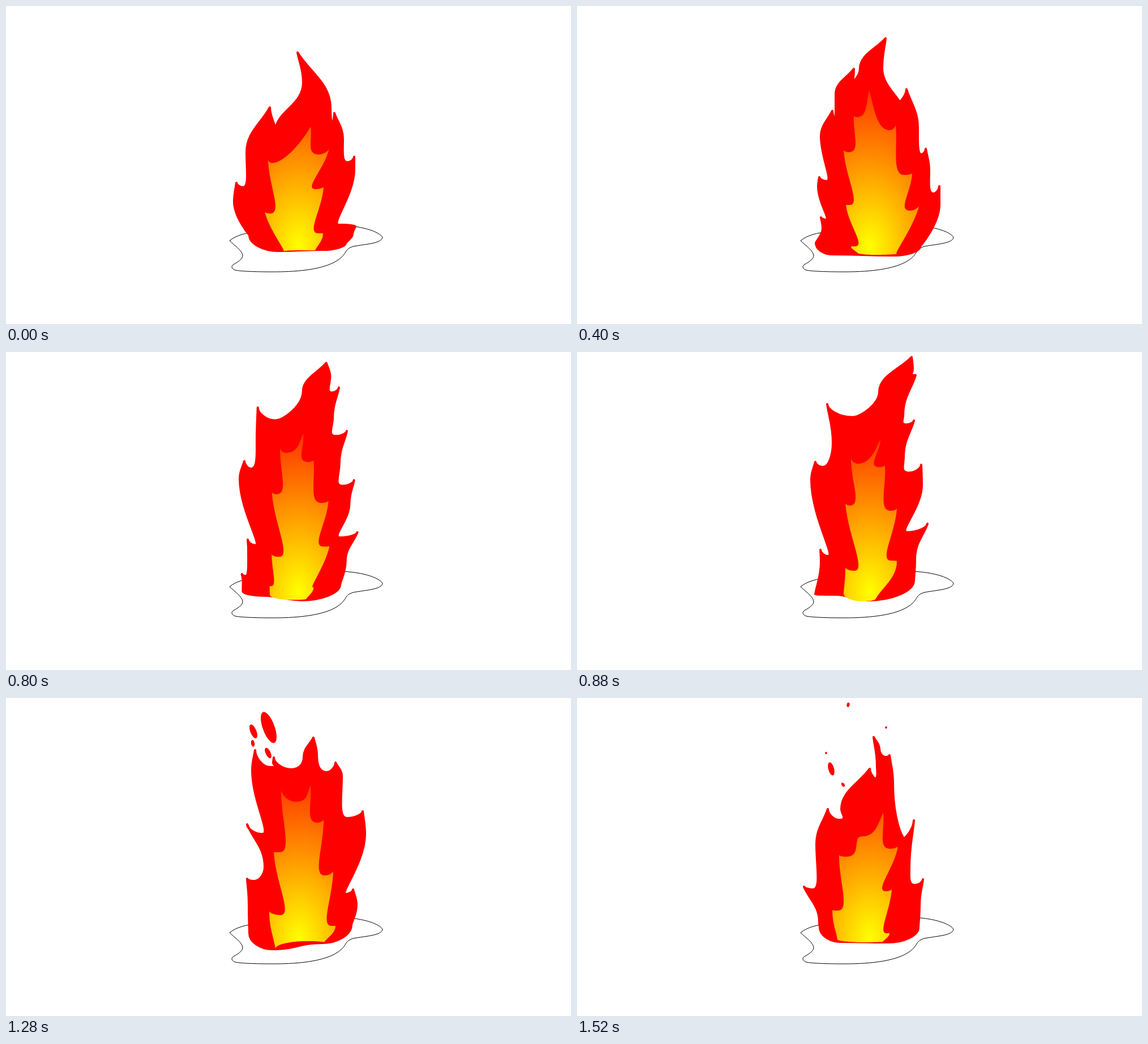
Write an HTML page with a canvas that moves like this. It is 998 by 561 pixels and loops after 1.6 s.

```html
<!DOCTYPE html>
<html lang="en">
<head>
<meta charset="utf-8">
<title>Fire</title>
<style>
html, body { margin: 0; width: 100%; height: 100%; overflow: hidden; background: #fff; }
canvas { display: block; width: 998px; height: 561px; }
</style>
</head>
<body>
<canvas id="stage" width="998" height="561"></canvas>
<script>
const LOOP = 1600, STEP = 80, RISE = 18;
const ctx = document.getElementById('stage').getContext('2d');
const poses = [];

const mix = (a, b, k) => a.map((v, i) => v + (b[i] - v) * k);
const clamp = (v, lo, hi) => Math.min(hi, Math.max(lo, v));
const group = (list, n) => list.length ? [list.slice(0, n), ...group(list.slice(n), n)] : [];

// A side runs from apex to foot. Outer tongues: tip, belly, valley. Inner tongues: tip, valley.
// Sparks: x, y, half length, tilt in degrees.
function pose(at, { outer, inner, sparks = [] }) {
  const shape = ([left, right, foot], size) => ({
    left: group(group(left, 2), size),
    right: group(group(right, 2), size),
    foot: group(foot, 2)
  });
  poses.push({ at, outer: shape(outer, 3), inner: shape(inner, 2), sparks: group(sparks, 4) });
}

pose(0, {
  outer: [
    [515, 82, 525, 135, 476, 221, 466, 179, 425, 258, 419, 320, 407, 312, 403, 345, 430, 404],
    [515, 82, 573, 180, 575, 220, 580, 189, 595, 235, 603, 276, 615, 266, 615, 288, 588, 386,
      617, 389, 612, 402, 600, 418],
    [480, 432, 560, 430]],
  inner: [
    [538, 213, 470, 277, 463, 271, 467, 366, 457, 363, 490, 433],
    [538, 213, 552, 262, 571, 250, 547, 323, 561, 319, 552, 401, 560, 401, 546, 431],
    [515, 431]]
});

pose(400, {
  outer: [
    [545, 57, 500, 110, 487, 143, 489, 111, 457, 155, 457, 208, 451, 185, 431, 230, 441, 309,
      428, 302, 426, 318, 440, 377, 431, 373, 434, 392, 422, 418],
    [545, 57, 539, 110, 570, 170, 582, 147, 602, 215, 608, 262, 616, 252, 622, 290, 629, 331,
      640, 318, 640, 350, 606, 424],
    [450, 438, 560, 440]],
  inner: [
    [516, 148, 495, 196, 489, 194, 480, 258, 471, 254, 482, 351, 475, 351, 491, 424, 484, 424, 495, 435],
    [516, 148, 552, 219, 563, 209, 578, 298, 592, 295, 588, 361, 605, 350, 565, 437],
    [525, 439]]
});

pose(640, {
  outer: [
    [515, 40, 506, 68, 455, 132, 450, 110, 425, 150, 432, 212, 421, 190, 411, 220, 434, 303,
      421, 295, 422, 308, 428, 332, 408, 321, 414, 360, 413, 412],
    [515, 40, 531, 70, 541, 133, 568, 106, 579, 128, 584, 189, 616, 176, 612, 225, 611, 283,
      628, 281, 601, 335, 604, 346, 624, 348, 605, 378, 580, 425],
    [450, 433, 540, 437]],
  inner: [
    [504, 124, 490, 140, 485, 134, 470, 211, 461, 209, 468, 312, 460, 311, 463, 387, 455, 386, 456, 433],
    [504, 124, 533, 176, 542, 173, 563, 239, 579, 235, 572, 294, 584, 290, 572, 376, 574, 376, 535, 437],
    [495, 432]],
  sparks: [484, 26, 16, -48, 496, 46, 10, -60, 645, 258, 14, 25, 634, 283, 4, 15, 566, 10, 3, 0]
});

pose(880, {
  outer: [
    [591, 9, 534, 70, 486, 115, 442, 92, 452, 160, 434, 203, 421, 194, 414, 225, 444, 360,
      430, 349, 431, 370, 421, 427],
    [591, 9, 593, 30, 593, 41, 598, 41, 576, 112, 582, 128, 595, 121, 577, 185, 586, 213,
      608, 199, 609, 235, 583, 318, 619, 303, 597, 365, 595, 403],
    [455, 428, 515, 438]],
  inner: [
    [536, 154, 496, 197, 484, 187, 482, 271, 474, 266, 490, 386, 474, 380, 471, 426],
    [536, 154, 534, 203, 544, 200, 554, 280, 565, 276, 555, 368, 565, 369, 528, 435],
    [505, 440]]
});

pose(1120, {
  outer: [
    [540, 115, 503, 123, 482, 93, 454, 73, 458, 95, 443, 122, 429, 106, 424, 150, 458, 304,
      445, 309, 430, 392, 436, 420],
    [540, 115, 543, 125, 550, 137, 574, 103, 604, 160, 606, 202, 623, 199, 624, 218, 603, 300,
      627, 283, 634, 315, 600, 405],
    [468, 437, 545, 439]],
  inner: [
    [498, 166, 488, 206, 474, 204, 490, 317, 480, 318, 478, 378, 472, 395, 473, 434],
    [498, 166, 547, 206, 565, 201, 576, 267, 585, 267, 569, 370, 577, 371, 532, 438],
    [505, 434]],
  sparks: [429, 30, 4, 25, 441, 53, 14, -18, 580, 11, 9, -5, 594, 32, 8, 10,
    568, 54, 7, -5, 546, 103, 6, 35, 421, 306, 8, -33]
});

pose(1280, {
  outer: [
    [543, 70, 526, 104, 504, 126, 473, 105, 472, 115, 467, 122, 440, 92, 435, 128, 453, 240,
      426, 223, 457, 298, 438, 323, 426, 319, 429, 365, 430, 415],
    [543, 70, 549, 100, 566, 131, 582, 114, 593, 138, 602, 212, 630, 200, 634, 240, 600, 346,
      613, 338, 619, 365, 610, 400],
    [470, 443, 560, 432]],
  inner: [
    [538, 154, 512, 183, 486, 161, 484, 272, 473, 272, 485, 383, 465, 376, 476, 442],
    [538, 154, 550, 220, 561, 214, 563, 313, 578, 305, 575, 402, 582, 402, 562, 431],
    [530, 429]],
  sparks: [464, 52, 29, -20, 437, 59, 13, -22, 436, 80, 6, -10, 463, 97, 10, -25]
});

pose(1520, {
  outer: [
    [524, 69, 530, 120, 527, 143, 517, 125, 467, 196, 463, 215, 443, 196, 423, 258, 417, 338,
      401, 333, 428, 395, 429, 405],
    [524, 69, 534, 90, 545, 104, 552, 101, 558, 150, 577, 248, 595, 216, 587, 300, 597, 330,
      611, 320, 605, 365, 603, 405],
    [465, 430, 550, 431]],
  inner: [
    [541, 202, 505, 244, 496, 248, 475, 280, 463, 277, 461, 375, 451, 374, 460, 426],
    [541, 202, 553, 266, 567, 261, 546, 341, 556, 337, 547, 415, 552, 415, 540, 430],
    [505, 431]],
  sparks: [479, 12, 4, 15, 546, 52, 2, 45, 440, 97, 2, 0, 449, 125, 12, -15, 470, 153, 4, -35]
});

const puddle = new Path2D('M395 414C407 404 425 400 445 398L580 387C625 386 660 398 665 408' +
  'C664 419 635 420 614 424C596 429 604 437 585 449C555 469 490 469 470 469' +
  'C440 469 415 468 405 466C397 463 398 458 402 456C412 450 418 446 418 440C417 431 404 423 395 414Z');

// Tongues pair up from the apex down; spare ones grow out of the foot.
function morphSide(a, b, k) {
  const size = a[0].length;
  const tongue = (s, i) => s[i] || Array(size).fill(s[s.length - 1][size - 1]);
  return Array.from({ length: Math.max(a.length, b.length) }, (_, i) =>
    tongue(a, i).map((p, j) => mix(p, tongue(b, i)[j], k)));
}

// Cubic pieces of one side; `side` is +1 where inward points right.
function sideCurves(tongues, side) {
  const out = [];
  tongues.forEach((tongue, i) => {
    const tip = tongue[0], valley = tongue[tongue.length - 1];
    const belly = tongue.length > 2 ? tongue[1] : null;
    const next = tongues[i + 1] && tongues[i + 1][0];
    const from = belly || tip;
    const drop = valley[1] - from[1];

    if (belly) {
      out.push([tip, mix(tip, belly, 0.35), [belly[0], belly[1] - 0.45 * (belly[1] - tip[1])], belly]);
    }
    if (!next) {
      out.push([from, [from[0], from[1] + 0.45 * drop], mix(valley, from, 0.3), valley]);
      return;
    }
    // Wide hooks get a round valley, steep ones a sharp notch.
    const dx = next[0] - valley[0], dy = next[1] - valley[1], width = Math.abs(dx);
    const sharp = clamp(-dy / (width || 1) - 1.4, 0, 1);
    const curl = belly ? Math.min(16, 0.9 * width) : Math.min(22, 2 * width + 6);
    const lean = belly ? 0 : 0.25 * (valley[0] - tip[0]);
    out.push([from, [from[0] + lean, from[1] + 0.47 * drop],
      [valley[0] + side * curl * (1 - sharp), valley[1] - 0.4 * drop * sharp], valley]);
    out.push([valley, [valley[0] + 0.55 * dx * (1 - sharp), valley[1] + 0.3 * dy * sharp],
      [next[0], next[1] - 0.4 * dy], next]);
  });
  return out;
}

function footCurves(left, mids, right) {
  const pts = [left, ...mids, right], last = pts.length - 1;
  return pts.slice(1).map((b, i) => {
    const a = pts[i], dx = 0.5 * (b[0] - a[0]), dy = 0.55 * (b[1] - a[1]);
    return [a,
      i ? [a[0] + dx, a[1]] : [a[0], a[1] + dy],
      i + 1 < last ? [b[0] - dx, b[1]] : [b[0], b[1] - dy], b];
  });
}

function trace(a, b, k) {
  const left = sideCurves(morphSide(a.left, b.left, k), 1);
  const right = sideCurves(morphSide(a.right, b.right, k), -1);
  const mids = a.foot.map((p, i) => mix(p, b.foot[i], k));
  const foot = footCurves(left[left.length - 1][3], mids, right[right.length - 1][3]);
  const back = right.map(c => c.slice().reverse()).reverse();
  ctx.beginPath();
  ctx.moveTo(...left[0][0]);
  for (const [, p, q, end] of [...left, ...foot, ...back]) ctx.bezierCurveTo(...p, ...q, ...end);
  ctx.closePath();
}

// Radial glow, narrower than tall, centred on the hot spot.
const HOT = [517, 424], SQUASH = 0.65;
const glow = ctx.createRadialGradient(0, 0, 0, 0, 0, 350);
glow.addColorStop(0, '#ffff00');
glow.addColorStop(1, '#ff0000');

function drawSparks(t) {
  ctx.fillStyle = '#f00';
  for (const { at, sparks } of poses) {
    const age = (t - at) / STEP;
    if (Math.abs(age) > 1) continue;
    for (const [x, y, len, deg] of sparks) {
      ctx.beginPath();
      ctx.ellipse(x, y - RISE * age, 1.2 + 0.32 * len, len, deg * Math.PI / 180, 0, 2 * Math.PI);
      ctx.fill();
    }
  }
}

function draw(t) {
  const i = poses.filter(p => p.at <= t).length;
  const a = poses[i - 1], b = poses[i % poses.length];
  const k = (t - a.at) / ((b.at || LOOP) - a.at);

  ctx.fillStyle = '#fff';
  ctx.fillRect(0, 0, 998, 561);
  ctx.lineWidth = 1;
  ctx.strokeStyle = '#000';
  ctx.stroke(puddle);

  trace(a.outer, b.outer, k);
  ctx.fillStyle = ctx.strokeStyle = '#f00';
  ctx.lineWidth = 4;
  ctx.lineJoin = 'round';
  ctx.fill();
  ctx.stroke();

  trace(a.inner, b.inner, k);
  ctx.save();
  ctx.translate(...HOT);
  ctx.scale(SQUASH, 1);
  ctx.fillStyle = glow;
  ctx.fill();
  ctx.restore();

  drawSparks(t);
}

let start, shown = 0;
function tick(now) {
  start ??= now;
  const t = Math.floor((now - start) % LOOP / STEP) * STEP;
  if (t !== shown) draw(shown = t);
  requestAnimationFrame(tick);
}
draw(0);
requestAnimationFrame(tick);
</script>
</body>
</html>
```
